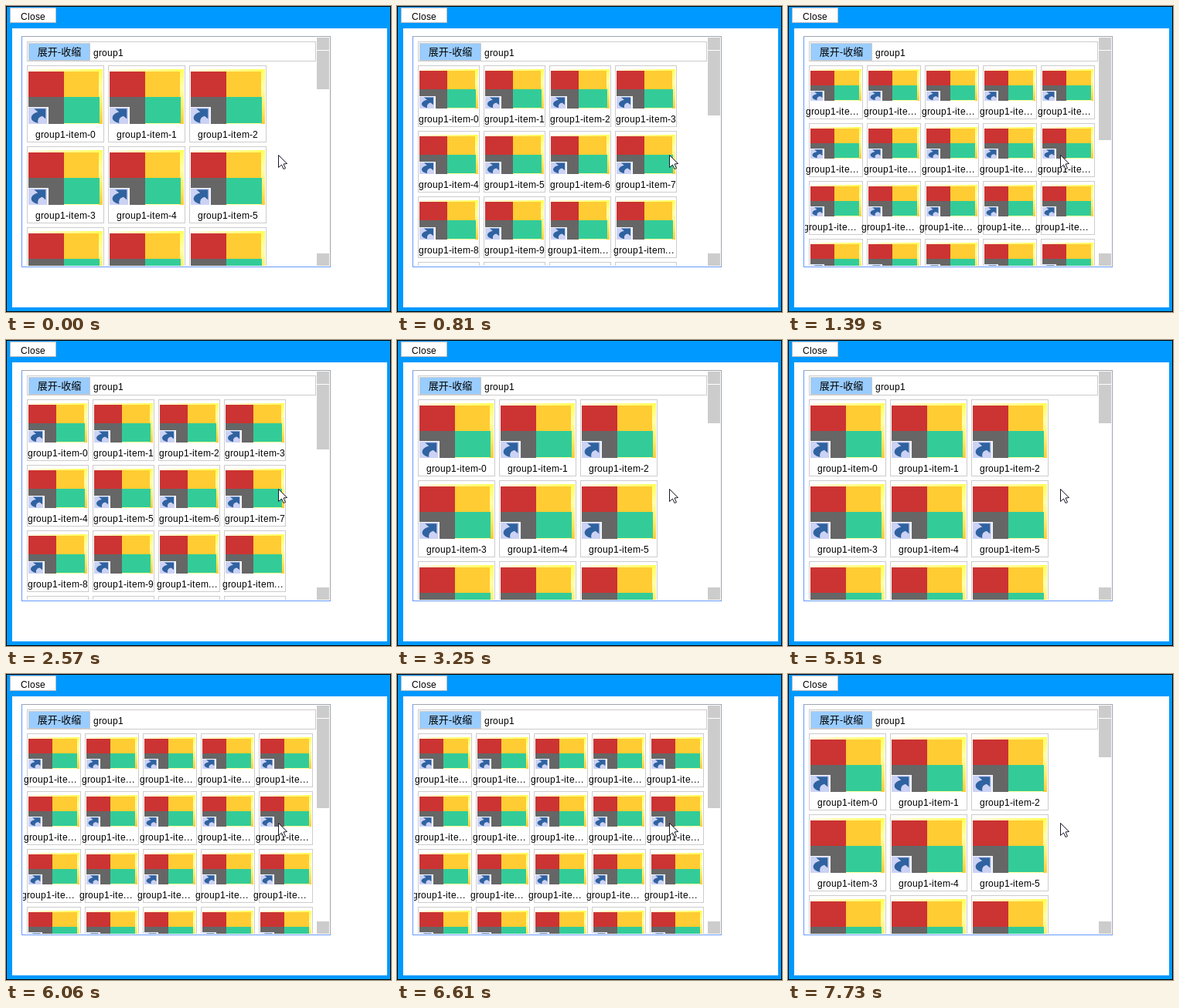
Write an HTML page with a canvas that moves like this. It is 498x397 px and loops after 8 s.

```html
<!DOCTYPE html>
<html lang="zh">
<head>
<meta charset="utf-8">
<title>Zoomable item list</title>
<style>
html, body { margin: 0; width: 100%; height: 100%; overflow: hidden; background: #09f; }
canvas { display: block; }
</style>
</head>
<body>
<canvas id="stage" width="498" height="397"></canvas>
<script>
const ctx = document.getElementById('stage').getContext('2d');
const LOOP = 8000;
const ITEMS = 40;
const GAP = 5;
const LATIN = '12px "Liberation Sans", Arial, sans-serif';
const HAN = '13px "Noto Sans CJK SC", "Noto Sans CJK", sans-serif';

// [time in ms, tile size]
const zoom = [
  [0, 100], [100, 90], [810, 80], [900, 70], [1270, 60], [1390, 70],
  [2570, 80], [2880, 90], [3250, 100], [3370, 110], [3620, 120],
  [3650, 130], [3680, 140], [4050, 130], [5140, 120], [5260, 110],
  [5510, 100], [5910, 90], [5980, 80], [6060, 70], [6550, 60],
  [6610, 70], [7640, 80], [7690, 90], [7730, 100]
];

function sizeAt(t) {
  let size = zoom[0][1];
  for (const [start, value] of zoom) if (t >= start) size = value;
  return size;
}

function rect(x, y, w, h, color) {
  ctx.fillStyle = color;
  ctx.fillRect(x, y, w, h);
}

function box(x, y, w, h, edge, fill) {
  rect(x, y, w, h, edge);
  rect(x + 1, y + 1, w - 2, h - 2, fill);
}

// Advances sit on whole pixels, as in a hinted UI font.
const advance = ch => Math.round(ctx.measureText(ch).width + 0.2);
const textWidth = s => [...s].reduce((sum, ch) => sum + advance(ch), 0);

function text(s, x, y) {
  ctx.fillStyle = '#000';
  for (const ch of s) {
    ctx.fillText(ch, x, y);
    x += advance(ch);
  }
}

function truncate(s, limit) {
  if (textWidth(s) <= limit) return s;
  while (textWidth(s + '...') > limit) s = s.slice(0, -1);
  return s + '...';
}

function gradient(x0, y0, x1, y1, colors) {
  const g = ctx.createLinearGradient(x0, y0, x1, y1);
  colors.forEach((c, i) => g.addColorStop(i / (colors.length - 1), c));
  return g;
}

function shortcut(x, y, w, h) {
  rect(x, y, w, h, '#f4f6ff');
  rect(x, y + 1, w - 2, h - 1, '#ccd2f4');
  ctx.save();
  ctx.translate(x, y);
  ctx.scale(w, h);
  ctx.beginPath();
  ctx.moveTo(0.28, 0.1);
  ctx.lineTo(0.86, 0.1);
  ctx.lineTo(0.86, 0.7);
  ctx.lineTo(0.69, 0.53);
  ctx.quadraticCurveTo(0.42, 0.6, 0.48, 0.95);
  ctx.quadraticCurveTo(0.12, 0.85, 0.14, 0.6);
  ctx.quadraticCurveTo(0.2, 0.38, 0.47, 0.3);
  ctx.closePath();
  ctx.fillStyle = '#2f62a0';
  ctx.fill();
  ctx.restore();
}

function picture(x, y, w, h) {
  const px = f => x + Math.round(w * f);
  const py = f => y + Math.round(h * f);
  const part = (l, t, r, b, color) =>
    rect(px(l), py(t), px(r) - px(l), py(b) - py(t), color);

  part(0, 0, 1, 1, '#ffff99');
  part(0, 0, 1, 0.04, gradient(x, 0, x + w, 0, ['#ffffee', '#ffff99', '#ffff55']));
  part(0.95, 0, 1, 1, gradient(0, y, 0, y + h, ['#ffff55', '#ffffaa', '#ffee66', '#ffcc33']));
  part(0, 0.04, 0.475, 0.505, '#cc3333');
  part(0.475, 0.04, 0.95, 0.505, '#ffcc33');
  part(0, 0.505, 0.475, 1, '#666666');
  part(0.475, 0.505, 0.955, 0.98, '#33cc99');
  shortcut(x, py(0.695), px(0.275) - x, y + h - py(0.695));
}

function tile(i, x, y, size) {
  box(x, y, size, size, '#ccc', '#fff');
  picture(x + 2, y + 5, size - 4, size - 29);
  const label = 'group1-item-' + i;
  const left = x + Math.ceil((size - textWidth(label)) / 2);
  text(truncate(label, size), left, y + size - 6);
}

function scrollbar(contentHeight) {
  const thumb = Math.round(264 * 296 / contentHeight);
  rect(402, 41, 16, 296, '#fff');
  rect(402, 41, 16, 16, '#ccc');
  rect(402, 58, 16, thumb - 1, '#ccc');
  rect(402, 321, 16, 16, '#ccc');
}

function list(size) {
  const pitch = size + GAP;
  const cols = Math.floor((374 + GAP) / pitch);
  const rows = Math.ceil(ITEMS / cols);
  ctx.save();
  ctx.beginPath();
  ctx.rect(22, 41, 396, 296);
  ctx.clip();
  for (let i = 0; i < ITEMS; i++) {
    const y = 77 + Math.floor(i / cols) * pitch;
    if (y > 337) break;
    tile(i, 27 + (i % cols) * pitch, y, size);
  }
  scrollbar(68 + rows * pitch);
  ctx.restore();
}

function frame() {
  rect(0, 0, 498, 397, '#000');
  rect(1, 1, 496, 395, '#0099ff');
  rect(8, 29, 485, 362, '#fff');

  ctx.font = LATIN;
  box(5, 2, 60, 20, '#b5bcc2', '#fff');
  text('Close', 19, 18);

  box(20, 39, 400, 300, '#6699ff', '#fff');
  rect(20, 39, 400, 1, '#a0a4ac');
  rect(419, 39, 1, 299, '#a0a4ac');

  box(27, 46, 374, 26, '#ccc', '#fff');
  box(29, 48, 80, 23, '#c4ccd4', '#99ccff');
  text('group1', 113, 65);
  ctx.font = HAN;
  ctx.textAlign = 'center';
  ctx.fillText('展开-收缩', 69, 64);
  ctx.textAlign = 'left';
  ctx.font = LATIN;
}

function cursor(x, y) {
  ctx.save();
  ctx.translate(x + 0.5, y + 0.5);
  ctx.beginPath();
  ctx.moveTo(0, 0);
  for (const [px, py] of [[0, 16], [4, 12.5], [6.5, 18], [9, 17], [6.5, 11.5], [11, 11]]) ctx.lineTo(px, py);
  ctx.closePath();
  ctx.fillStyle = '#fff';
  ctx.fill();
  ctx.strokeStyle = '#1a1a2a';
  ctx.lineWidth = 1;
  ctx.stroke();
  ctx.restore();
}

const start = performance.now();

function draw() {
  const t = (performance.now() - start) % LOOP;
  frame();
  list(sizeAt(t));
  cursor(352, 193);
  requestAnimationFrame(draw);
}

draw();
</script>
</body>
</html>
```
